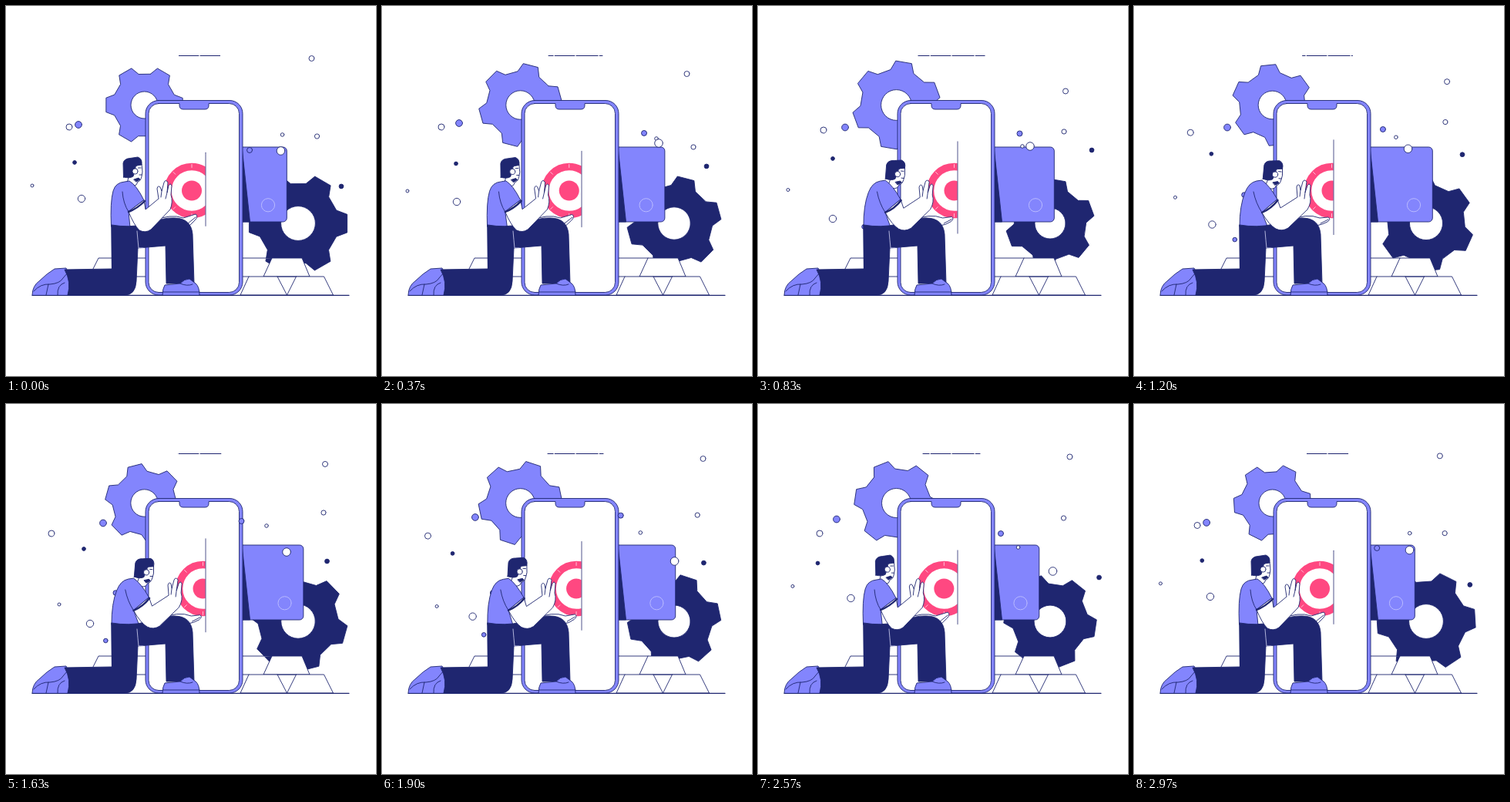
An HTML page with a canvas that plays this animation: 480 by 480 pixels, repeating every 3000 ms.

```html
<!DOCTYPE html>
<html>
<head>
<meta charset="utf-8">
<style>
html, body { margin: 0; width: 100%; height: 100%; overflow: hidden; background: #fff }
canvas { display: block }
</style>
</head>
<body>
<canvas id="stage" width="480" height="480"></canvas>
<script>
const g = document.getElementById('stage').getContext('2d');
const LOOP = 3000, TAU = Math.PI * 2;
const NAVY = '#1f2670', VIOLET = '#8385fd', PINK = '#ff4881', WHITE = '#fff', PALE = '#b9baff';
g.lineJoin = g.lineCap = 'round';

function draw(shape, fill, stroke = NAVY, width = 0.9) {
  const p = typeof shape === 'string' ? new Path2D(shape) : shape;
  if (fill) { g.fillStyle = fill; g.fill(p); }
  if (stroke) { g.strokeStyle = stroke; g.lineWidth = width; g.stroke(p); }
}
function circle(x, y, r, fill, stroke, width) {
  const p = new Path2D();
  p.arc(x, y, r, 0, TAU);
  draw(p, fill, stroke, width);
}
function box(x, y, w, h, r, fill) {
  const p = new Path2D();
  p.roundRect(x, y, w, h, r);
  draw(p, fill);
}
// Blend two paths that have the same commands
function mix(a, b, f) {
  const end = b.match(/-?[\d.]+/g);
  let i = 0;
  return a.replace(/-?[\d.]+/g, n => +n + (end[i++] - n) * f);
}
const cubic = u => u < 0.5 ? 4 * u ** 3 : 1 - 4 * (1 - u) ** 3;
const lean = t => t < 1220 ? cubic(t / 1220) : 1 - cubic(Math.min(1, (t - 1220) / 1640));

// Drifting dots: radius, then x,y at each of the key times
const KEYS = [0, 370, 830, 1630, 2170, 2570], N = KEYS.length;
const rings = [
  [4, 82,157, 77,157, 85,161, 59,168, 65,173, 80,168],
  [4.7, 98,250, 97,254, 97,276, 109,285, 125,263, 120.5,252],
  [3.5, 396.5,68, 395.5,88, 399,110.5, 414,78, 416,67, 404.5,68.5],
  [3.1, 403.5,169, 404,183, 397,163, 412,141, 403.5,149.5, 396.5,148],
  [2.3, 358.5,167, 356,172, 343,182, 338,158, 333.5,180, 337.5,186],
  [2, 34,233, 33,240, 39,238.5, 69,260, 67,259.5, 45,236.5],
  [5.3, 356.5,188, 359,178, 353,182, 364,192, 393.5,216, 382.5,217]
];
const violets = [
  [4.4, 94,154, 100,152, 113,157.5, 126,154.5, 112.5,140.5, 102,149.5],
  [3.5, 316,187, 340,165, 339.5,165.5, 305.5,152, 317.5,142, 315,168]
];
const navies = [
  [2.4, 89,203, 96,204.5, 97,198, 101,188, 80.5,202, 77.5,206.5],
  [2.9, 435,234, 421,208, 433,187, 416.5,204, 423,209, 442.5,225]
];
function drift(dot, axis, t) {
  const val = j => dot[1 + (j + N) % N * 2 + axis];
  const key = j => KEYS[(j + N) % N] + LOOP * Math.floor(j / N);
  const slope = j => (val(j + 1) - val(j - 1)) / (key(j + 1) - key(j - 1));
  let i = N - 1;
  while (KEYS[i] > t) i--;
  const d = key(i + 1) - key(i), u = (t - key(i)) / d, v = 1 - u;
  return v * v * (1 + 2 * u) * val(i) + u * u * (3 - 2 * u) * val(i + 1)
    + d * u * v * (v * slope(i) - u * slope(i + 1));
}
function dots(list, fill, t) {
  for (const d of list) circle(drift(d, 0, t), drift(d, 1, t), d[0], fill);
}

function gear(x, y, r, turn, fill) {
  const p = new Path2D();
  for (let i = 0; i < 6; i++)
    for (const [deg, k] of [[-19, .82], [-10.5, 1.01], [10.5, 1.01], [19, .82]]) {
      const a = turn + (i * 60 + 30 + deg) * TAU / 360;
      p.lineTo(x + r * k * Math.sin(a), y - r * k * Math.cos(a));
    }
  p.closePath();
  draw(p, fill);
  circle(x, y, r * .35, WHITE);
}

function card(f) {
  const right = 364.3 + 23 * f;
  box(296, 183, right - 296, 97, 5, VIOLET);
  draw('M306 183L316.5 280H306Z', NAVY);
  circle(right - 24.3, 258.3, 8.6, null, PALE, 1);
}

function phone() {
  box(181, 122.5, 126, 252.5, 17, VIOLET);
  box(185, 126.5, 117.5, 245, 13, WHITE);
  draw('M225 126.5V129Q225 134 230 134H258Q263 134 263 129V126.5', VIOLET);
  draw('M226 126H262', null, VIOLET, 2);
}

function coin(f) {
  const x = 241 + 15.5 * f, y = 239.5;
  g.save();
  g.beginPath();
  g.rect(185, 130, 74, 230);
  g.clip();
  circle(x, y, 31, WHITE, PINK, 9.5);
  for (let i = 0; i < 8; i++) {
    const a = i * TAU / 8, c = Math.cos(a), s = Math.sin(a);
    draw(`M${x + 30 * c} ${y + 30 * s}L${x + 34 * c} ${y + 34 * s}`, null, '#ffc1d6', 1);
  }
  circle(x, y, 13, PINK, null);
  g.restore();
  const mid = 237.8 - 2.7 * f, half = 47.5 + 13.8 * f;
  draw(`M259 ${mid - half}V${mid + half}`, null, '#6d719f', 1.2);
}

function man(f) {
  // Far hand under the coin
  draw(mix('M190 279Q214 269 230 275L246 270Q250 273 245 278L238 285L226 286Z',
           'M200 279Q224 268 241 275L252 274Q256 276 251 280L244 283L233 286Z', f), WHITE);
  draw(mix('M236 282L246 274', 'M242 282L252 277', f), null);

  // Head
  g.save();
  g.translate(164 + 15.5 * f, 215 + 3.7 * f);
  g.rotate(.12 * f);
  g.translate(-164, -215);
  draw('M160 218L157 230Q163 236 169 232L171 228Q175 227 176 221L177 215L176 205L163 204Z', WHITE);
  draw('M152.500 222L152 204Q153 198 161 197.500L171 196Q177 198 176 206L170 207Q167 208 168 211L165 221Q161 224 152.500 222Z', NAVY);
  draw('M166 225L172 223L174 225L169 228Z', NAVY);
  circle(167.500, 214.500, 3.6, WHITE);
  draw('M171.500 210H175M173 219H176', null);
  g.restore();

  // Shirt
  draw(mix('M136.500 286Q135 254 139 240Q142 229 154 228L160 227Q169 232 179 252L159 267L161 287Z',
           'M137 286Q137 259 144 242Q149 229 159 227L166 226Q176 233 186 251L166 268L174 288Z', f), VIOLET);

  // Shoes, trousers
  draw('M34 375Q34 363 44 356Q53 347 63 341L78 340L84 352L81 375Z', VIOLET);
  draw('M36 370Q45 360 57 361Q70 360 74 353L80 346M52 375L55 361M67 375Q66 362 76 359', null);
  draw('M137 284Q160 288 181 283Q205 274 218 275Q240 275 242 296L244 360H208L207 311L171 314L169 357Q168 375 154 375H80Q85 358 76 342L137 341Z', NAVY);
  draw('M170 292Q171 304 172 314H178', null, '#d5d6f4', .8);
  draw('M203 375Q203 367 206 362L226 360Q231 354 238 354L246 360Q251 364 251 375Z', VIOLET);
  draw('M204 371H251M226 360Q235 364 242 361', null);

  // Near arm
  draw(mix('M159 267Q166 284 173 291Q181 295 188 290L213 264Q217 254 214 245L215 233Q213 229 211 233L209 242L210 229Q207 224 205 229L202 240L200 235Q197 232 196 237L198 250L181 264L179 252Z',
           'M166 268Q175 284 184 289Q192 293 200 288L225 264Q231 254 228 245L229 233Q227 229 225 233L222 242L224 228Q221 224 219 228L216 239L215 233Q212 230 211 235L212 248L190 262L186 251Z', f), WHITE);
  draw(mix('M202 240L201 248M209 242L207 250', 'M216 239L215 247M222 242L221 250', f), null);
  draw(mix('M159 267Q170 263 180 253', 'M166 268Q178 263 186.500 252', f), null, NAVY, 2.4);
  draw(mix('M151 241Q152 256 159 267', 'M155 241Q158 256 166 268', f), null);
}

function render(t) {
  const f = lean(t), turn = t / LOOP * TAU, pulse = Math.cos(2 * turn);
  const s = Math.sin(turn / 2);
  g.fillStyle = WHITE;
  g.fillRect(0, 0, 480, 480);

  // Dashed bar, revealed from its middle
  const half = 35.5 - 8.5 * pulse;
  g.fillStyle = NAVY;
  g.fillRect(251 - half, 64, half * 2, 1);
  g.fillStyle = WHITE;
  for (const x of [222.5, 250.3, 280.5]) g.fillRect(x, 63, 1.3, 3);

  gear(179.5, 128.5, 53.5 - 3.5 * pulse, turn, VIOLET);
  gear(379, 282, 60.5 + 3.5 * pulse, turn, NAVY);

  // Stacked bars and ground
  draw('M113 341L120 327H384L394 351H334L345 327', WHITE);
  draw('M150 351H412.500L424.500 375H304L315 351M352 351L364.500 375L376.500 351', WHITE);
  draw('M34 375.300H445', null, NAVY, 1.2);

  card(f);
  phone();
  coin(f);
  dots(rings, WHITE, t);
  dots(violets, VIOLET, t);
  dots(navies, NAVY, t);
  circle(165 - 36 * s, 282 + 26 * Math.sin(turn - TAU / 4), 2.8, VIOLET);
  circle(160 - 18 * s, 245, 3.2, VIOLET);
  man(f);
}

function tick() {
  render(performance.now() % LOOP);
  requestAnimationFrame(tick);
}
tick();
</script>
</body>
</html>
```
